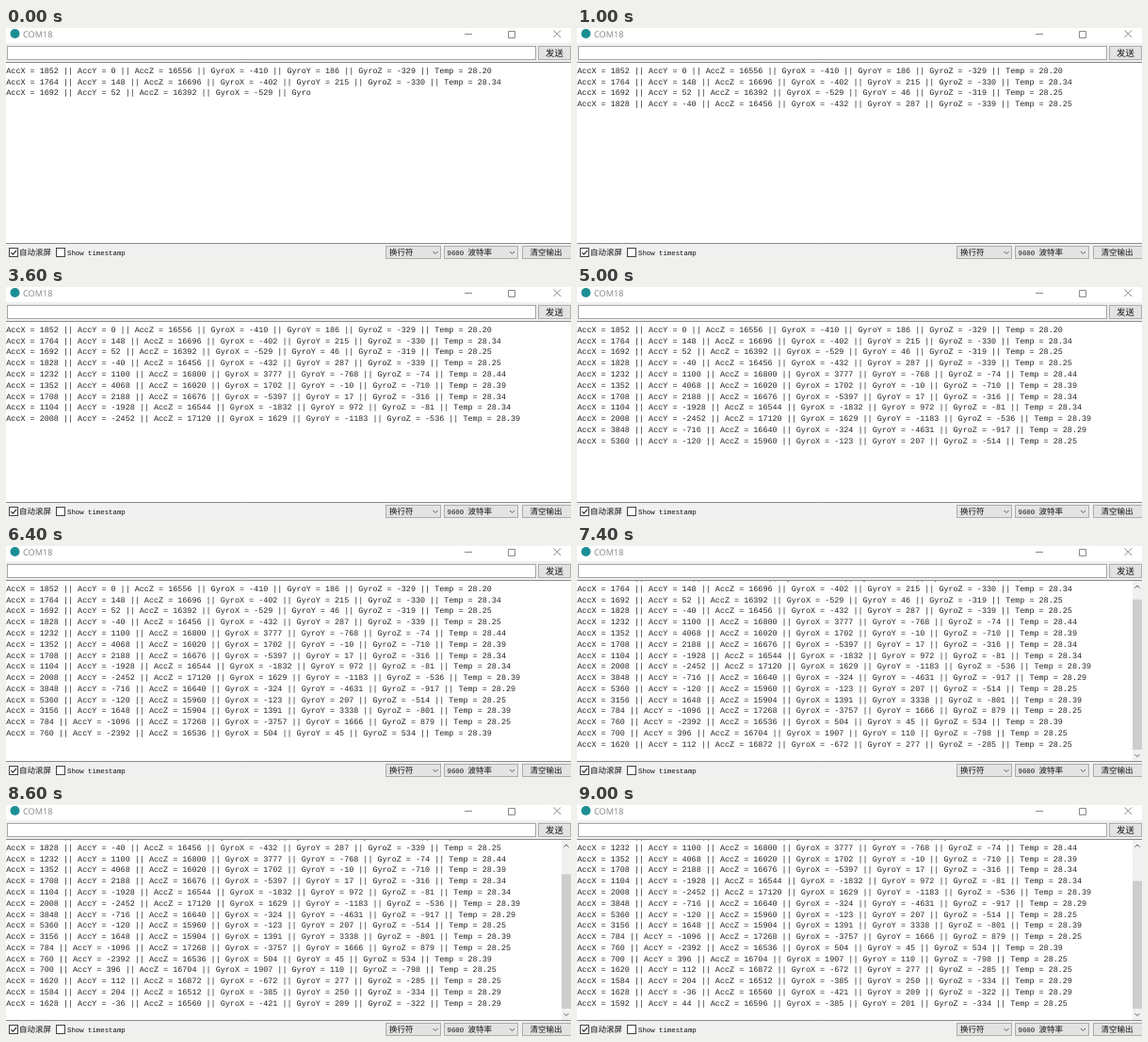
Animation of 600 by 245 pixels, one loop 9200 ms. Source, as an HTML page:

```html
<!DOCTYPE html>
<html lang="en">
<head>
<meta charset="utf-8">
<title>Serial monitor</title>
<style>
  html, body { margin: 0; width: 100%; height: 100%; overflow: hidden; background: #fff; }
  svg { display: block; width: 600px; height: 245px; }
  text { text-rendering: geometricPrecision; fill: #111; }
  .log text { font: 8.44px "Liberation Mono", monospace; fill: #222; }
  .ui text { font: 8.5px "Noto Sans CJK SC", "Noto Sans CJK", sans-serif; }
  .ui .mono { font: 7.35px "Liberation Mono", monospace; }
  .ui .title { font: 9.2px "Open Sans", sans-serif; fill: #858585; }
  .box { fill: #e3e3e3; stroke: #adadad; }
  .check { fill: #fff; stroke: #444; }
  .line { fill: none; stroke: #8a8a8a; }
  .arrow { fill: none; stroke: #606060; }
</style>
</head>
<body>
<svg viewBox="0 0 600 245">
  <defs><clipPath id="view"><rect y="37" width="600" height="191"/></clipPath></defs>
  <rect width="600" height="245" fill="#fff"/>

  <g class="log" clip-path="url(#view)"><g id="lines"></g></g>

  <g id="bar" visibility="hidden">
    <rect x="590" y="37" width="10" height="191" fill="#f0f0f0"/>
    <rect id="thumb" x="590" width="10" fill="#cdcdcd"/>
    <path class="arrow" d="M592.5 44.5l2.5-2.5 2.5 2.5M592.5 221l2.5 2.5 2.5-2.5"/>
  </g>

  <g class="ui">
    <circle cx="9.5" cy="6" r="5" fill="#1b8e94"/>
    <text class="title" x="18" y="9.6">COM18</text>
    <path class="line" d="M487 6.5h8M533.5 3.5h7v7h-7zM581.5 2.5l7.5 7.5M589 2.5l-7.5 7.5"/>

    <rect y="16" width="600" height="21" fill="#f0f0f0"/>
    <rect x="1.5" y="19.5" width="561" height="14" fill="#fff" stroke="#a5a5a5"/>
    <rect class="box" x="565.5" y="19.5" width="34" height="14"/>
    <text x="573" y="30" style="font-size:9.4px">发送</text>
    <path class="line" d="M0 36.5h600"/>

    <rect y="228" width="600" height="17" fill="#f0f0f0"/>
    <path class="line" d="M0 228.5h600"/>
    <rect class="check" x="3.5" y="233.5" width="9" height="9"/>
    <path d="M5.3 238l2 2.2 3.8-4.4" fill="none" stroke="#222" stroke-width="1.1"/>
    <text x="14" y="241.3">自动滚屏</text>
    <rect class="check" x="53.5" y="233.5" width="9" height="9"/>
    <text class="mono" x="65" y="240.8">Show timestamp</text>

    <rect class="box" x="403.5" y="231.5" width="58" height="13"/>
    <text x="407" y="241.3">换行符</text>
    <rect class="box" x="465.5" y="231.5" width="78" height="13"/>
    <text class="mono" x="468.5" y="240.8">9600</text>
    <text x="490.5" y="241.3">波特率</text>
    <path class="arrow" d="M453.5 237l2.5 2.5 2.5-2.5M535 237l2.5 2.5 2.5-2.5"/>
    <rect class="box" x="548.5" y="231.5" width="52" height="13"/>
    <text x="556.5" y="241.3">清空输出</text>
  </g>
</svg>
<script>
const LOOP = 9200, TICK = 200;
const FIRST = 350, PERIOD = 530;   // arrival of the third line, then one line per period
const CHUNK = 64;                  // serial buffer size in characters
const ROW = 11.78, BASE = 47.9, FIT = 15;

const labels = ['AccX', 'AccY', 'AccZ', 'GyroX', 'GyroY', 'GyroZ', 'Temp'];
const readings = `
1852 0 16556 -410 186 -329 28.20
1764 148 16696 -402 215 -330 28.34
1692 52 16392 -529 46 -319 28.25
1828 -40 16456 -432 287 -339 28.25
1232 1100 16800 3777 -768 -74 28.44
1352 4068 16020 1702 -10 -710 28.39
1708 2188 16676 -5397 17 -316 28.34
1104 -1928 16544 -1832 972 -81 28.34
2008 -2452 17120 1629 -1183 -536 28.39
3848 -716 16640 -324 -4631 -917 28.29
5360 -120 15960 -123 207 -514 28.25
3156 1648 15904 1391 3338 -801 28.39
784 -1096 17268 -3757 1666 879 28.25
760 -2392 16536 504 45 534 28.39
700 396 16704 1907 110 -798 28.25
1620 112 16872 -672 277 -285 28.25
1584 204 16512 -385 250 -334 28.29
1628 -36 16560 -421 209 -322 28.29
1592 44 16596 -385 201 -334 28.25`;

const log = readings.trim().split('\n').map(row =>
  row.split(' ').map((v, i) => `${labels[i]} = ${v}`).join(' || '));

const $ = id => document.getElementById(id);
const lines = $('lines'), bar = $('bar'), thumb = $('thumb');

const rows = log.map((_, i) => {
  const el = document.createElementNS('http://www.w3.org/2000/svg', 'text');
  el.setAttribute('x', 0.3);
  el.setAttribute('y', BASE + i * ROW);
  return lines.appendChild(el);
});

function render(t) {
  const pos = 3 + (t - FIRST) / PERIOD;
  const done = Math.floor(pos);
  const partial = t < 2 * TICK || pos - done > 0.88;

  rows.forEach((el, i) => {
    el.textContent = i < done ? log[i]
      : i === done && partial ? log[i].slice(0, CHUNK) : '';
  });

  const over = Math.max(0, done - FIT);
  lines.setAttribute('transform', `translate(0 ${-over * ROW})`);

  const size = 167 * Math.min(1, 191 / ((done + 1) * ROW));
  bar.setAttribute('visibility', done >= FIT ? 'visible' : 'hidden');
  thumb.setAttribute('y', 216 - size);
  thumb.setAttribute('height', size);
}

const start = performance.now();
let last = -1;
function frame(now) {
  const t = Math.floor(Math.max(0, now - start) % LOOP / TICK) * TICK;
  if (t !== last) render(last = t);
  requestAnimationFrame(frame);
}
frame(start);
</script>
</body>
</html>
```
